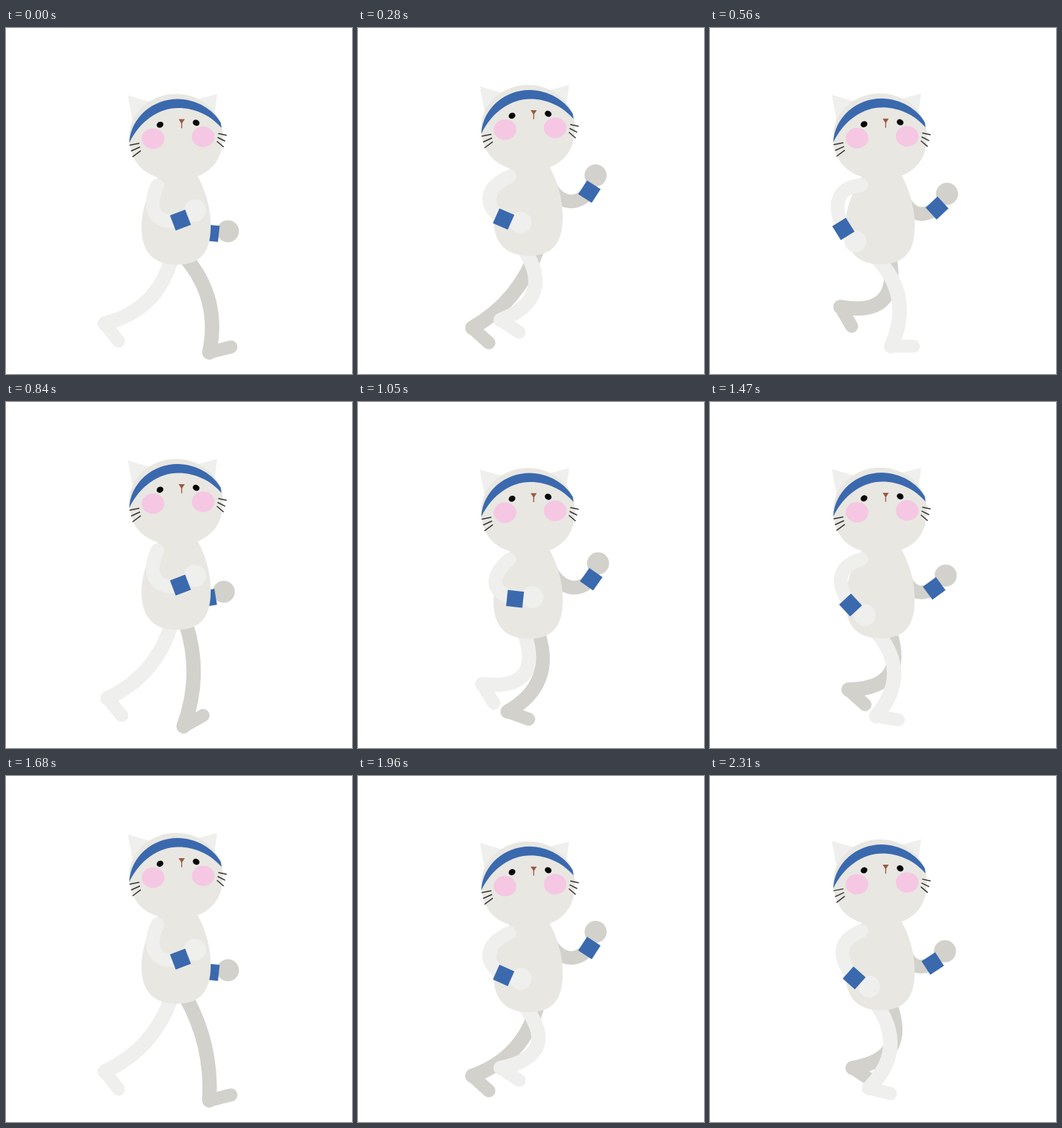
Recreate the animation shown at these times as an HTML page with a canvas. Size 480x480 px, loop 2.38 s.

```html
<!DOCTYPE html>
<html lang="en">
<head>
<meta charset="utf-8">
<title>Jogging cat</title>
<style>
html, body { margin: 0; width: 100%; height: 100%; overflow: hidden; background: #fff; }
canvas { display: block; width: 100vw; height: 100vh; object-fit: contain; }
</style>
</head>
<body>
<canvas id="stage" width="480" height="480"></canvas>
<script>
const ctx = document.getElementById('stage').getContext('2d');
const STEP = 70, STEPS = 34, STRIDE = 12, BOBS = 5;
const FUR = '#e8e7e2', LIGHT = '#efefed', SHADE = '#d2d1cb', BLUE = '#3b69ae';
const TURN = Math.PI * 2, DEG = TURN / 360;

// Heel x, y and foot angle over one stride, shared by both legs
const FRONT = [282, 450, -14], BACK = [137, 410, 52], LIFT = [181, 387, 60], LAND = [240, 450, -32];
const gait = [[0, FRONT], [4.7, BACK], [5, BACK], [8, LIFT], [11.5, LAND], [12, FRONT]];

// Wristband x, y and angle over one stride
const CHEST = [242, 254, -21];
const nearSwing = [[0, CHEST], [4, [202, 265, 24]], [6.5, [173, 246, 45]], [8, [185, 267, 58]],
  [9, [200, 271, 42]], [11.5, CHEST], [12, CHEST]];
const HANG = [284, 272, 6];
const farSwing = [[0, HANG], [2.5, [325, 232, -57]], [4, [321, 227, -57]], [8, [315, 238, -43]],
  [9, [309, 251, -33]], [11.5, [279, 272, -12]], [12, HANG]];

function sample(track, beat) {
  const t = (beat % STRIDE + STRIDE) % STRIDE;
  const i = track.findIndex(([end]) => end > t);
  const [a, from] = track[i - 1], [b, to] = track[i];
  return from.map((v, j) => v + (to[j] - v) * (t - a) / (b - a));
}

const polar = (x, y, r, deg) => [x + r * Math.cos(deg * DEG), y + r * Math.sin(deg * DEG)];

function fill(color, shape) {
  ctx.fillStyle = color;
  ctx.beginPath();
  shape();
  ctx.fill();
}

function stroke(color, width, shape) {
  ctx.strokeStyle = color;
  ctx.lineWidth = width;
  ctx.beginPath();
  shape();
  ctx.stroke();
}

const oval = (color, x, y, rx, ry = rx, turn = 0) =>
  fill(color, () => ctx.ellipse(x, y, rx, ry, turn, 0, TURN));

const poly = (color, ...pts) => fill(color, () => {
  for (let i = 0; i < pts.length; i += 2) ctx.lineTo(pts[i], pts[i + 1]);
});

const line = (color, width, x1, y1, x2, y2) => stroke(color, width, () => {
  ctx.moveTo(x1, y1);
  ctx.lineTo(x2, y2);
});

function arm(color, x, y, elbow, [wx, wy, angle]) {
  stroke(color, 19, () => {
    ctx.moveTo(x, y);
    ctx.bezierCurveTo(...polar(x, y, 36, elbow), ...polar(wx, wy, -36, angle + 8), wx, wy);
  });
  oval(color, ...polar(wx, wy, 24, angle - 12), 15.3);
  ctx.save();
  ctx.translate(wx, wy);
  ctx.rotate(angle * DEG);
  ctx.fillStyle = BLUE;
  ctx.fillRect(-11.3, -11.2, 22.6, 22.4);
  ctx.restore();
}

// The knee bends more as the heel comes closer to the hip
function leg(color, hx, hy, [x, y, angle]) {
  const dx = x - hx, dy = y - hy, reach = Math.hypot(dx, dy);
  const bend = (32 + 0.95 * (137 - reach)) / reach;
  stroke(color, 20, () => {
    ctx.moveTo(hx, hy);
    ctx.quadraticCurveTo(hx + dx / 2 + dy * bend, hy + dy / 2 - dx * bend, x, y);
  });
  line(color, 18, x, y, ...polar(x, y, 31, angle));
}

function body() {
  fill(FUR, () => {
    ctx.moveTo(215, 188);
    ctx.bezierCurveTo(200, 210, 188, 235, 188, 264);
    ctx.bezierCurveTo(188, 300, 206, 316, 237, 316);
    ctx.bezierCurveTo(270, 316, 284, 298, 284, 262);
    ctx.bezierCurveTo(284, 235, 276, 210, 263, 188);
  });
}

function head() {
  poly(LIGHT, 169, 81, 203, 91, 177, 124);
  poly(LIGHT, 293, 79, 263, 87, 288, 114);
  fill(FUR, () => {
    ctx.ellipse(236, 138, 65, 59, 0, TURN / 2, TURN);
    ctx.bezierCurveTo(301, 176, 277, 198, 236, 198);
    ctx.bezierCurveTo(195, 198, 171, 176, 171, 138);
  });
  fill(BLUE, () => {
    ctx.moveTo(171, 147);
    ctx.bezierCurveTo(173, 111, 204, 86, 238, 86);
    ctx.bezierCurveTo(264, 86, 288, 101, 298, 119);
    ctx.lineTo(299, 126);
    ctx.bezierCurveTo(284, 109, 263, 98.5, 239, 98.5);
    ctx.bezierCurveTo(212, 98.5, 186, 116, 171, 147);
  });
  oval('#f5c7e3', 204, 141, 15.7, 14.2);
  oval('#f5c7e3', 273.5, 138.5, 15.7, 14.2);
  oval('#080808', 213.7, 121.7, 4.8, 4.1, -0.5);
  oval('#080808', 263.8, 119, 4.8, 4.1, 0.5);
  poly('#98593f', 239.5, 114, 248, 114, 243.7, 120.5);
  line('#98593f', 1.3, 243.7, 118, 243.7, 126);
  for (let i = 0; i < 3; i++) {
    line('#333', 1.5, 172 + 2 * i, 150 + 8 * i, 184.5 + i, 147.5 + 5.3 * i);
    line('#333', 1.5, 295 - i, 134 + 5.5 * i, 305.5 - 2 * i, 136.3 + 8 * i);
  }
}

function draw(now) {
  const s = Math.floor(now / STEP) % STEPS;
  // The pace wavers: the limbs trail a little in the middle of the loop
  const drift = 0.6 * Math.sin((s - 8) / 32 * TURN);
  const beat = s - Math.max(0, drift);
  const bob = Math.max(0, 5.5 - 7 * Math.cos((s - drift - 4.1) * BOBS / STEPS * TURN));
  const wrist = sample(nearSwing, beat);

  ctx.fillStyle = '#fff';
  ctx.fillRect(0, 0, 480, 480);
  ctx.lineCap = ctx.lineJoin = 'round';

  leg(SHADE, 249, 306 + bob, sample(gait, beat));
  leg(LIGHT, 230, 306 + bob, sample(gait, beat - 7));
  ctx.save();
  ctx.translate(0, bob);
  arm(SHADE, 260, 203, 76, sample(farSwing, beat));
  body();
  head();
  arm(LIGHT, 210, 206, 186 - 1.04 * (wrist[0] - 173), wrist);
  ctx.restore();
}

const start = performance.now();
function tick() {
  draw(performance.now() - start);
  requestAnimationFrame(tick);
}
tick();
</script>
</body>
</html>
```
